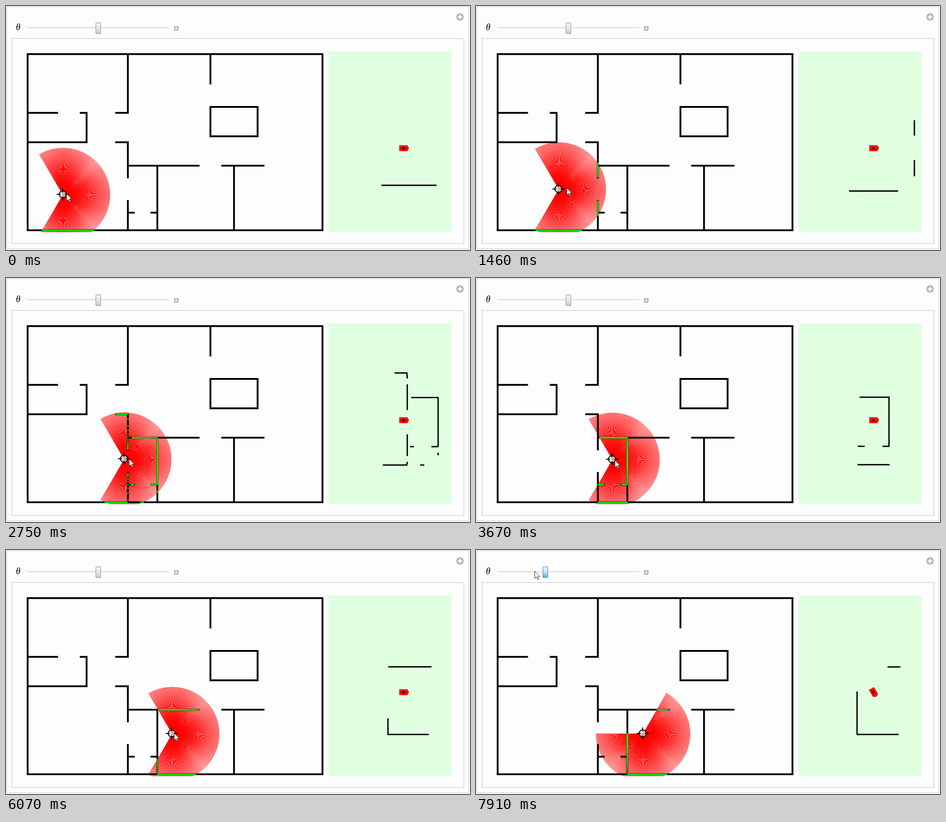
An HTML page with a canvas that plays this animation: 1030x544 px, repeating every 8 s.

```html
<!DOCTYPE html>
<html lang="en">
<head>
<meta charset="utf-8">
<title>Range scanner</title>
<style>
  html, body { margin: 0; width: 100%; height: 100%; overflow: hidden; background: #fff; }
  svg, canvas { position: absolute; left: 0; top: 0; width: 1030px; height: 544px; display: block; }
  text { font: italic 20px "Liberation Serif", "Noto Serif", serif; }
</style>
</head>
<body>
<svg viewBox="0 0 1030 544">
  <g fill="#fdfdfd" stroke="#c3c3c3">
    <rect x="1.5" y="1.5" width="1026" height="540" rx="1.5"/>
    <rect x="13.5" y="72.5" width="1003" height="457" stroke="#bdbdbd"/>
  </g>
  <text x="22" y="54">θ</text>
  <path d="M47 48.5H362" stroke="#b8b8b8"/>
  <rect x="373" y="45" width="10" height="10" fill="#b4b4b4"/>
  <path d="M375 50h6M378 47v6" stroke="#fff" stroke-width="1.6"/>
  <circle cx="1008" cy="24.5" r="8.5" fill="#b9b9b9"/>
  <path d="M1003 24.5h10M1008 19.5v10" stroke="#fff" stroke-width="2.6"/>
  <rect x="716" y="101" width="273" height="403.5" fill="#e0ffe0"/>
</svg>
<canvas id="stage" width="1030" height="544"></canvas>
<script>
const ctx = document.getElementById('stage').getContext('2d');
const LOOP = 8000, STEP = 184.1, START = 344, LAST = 43;
const UNIT = 65.45, ORIGIN = { x: 48, y: 107.3 };
const RANGE = 1.6 * UNIT, MIN_RANGE = 5.27, SPREAD = 120;
const SCALE = 1.046, JOIN = 15, HOME = { x: 882.5, y: 317 };
const REACH = 34, GRAB = 38;
const SLIDER = { x: 205, y: 46.5, pxPerDeg: 0.85 };

// Floor plan in room units.
const PLAN = `M0 0H10V6H0V0 M3.4 0V2H3 M6.2 0V1 M6.2 1.8H7.8V2.8H6.2V1.8
  M0 2H1 M1.8 2H2V3H0 M3 3H3.4V4.2 M3.4 5V6 M3.4 3.8H5.8 M6.6 3.8H8
  M4.4 3.8V6 M7 3.8V6 M3.4 5.4H3.6 M4.2 5.4H4.4`;

// Robot waypoints: step, x, y
const ROUTE = [
  [1, 126.5, 421], [5, 149.7, 418.3], [7, 168.5, 410.3], [11, 230.2, 403.8],
  [20, 303.2, 405.1], [22, 308, 410], [25, 308, 410], [28, 338.33, 410],
  [33, 369.1, 410], [REACH, 371, 409.8]
];

const rad = d => d * Math.PI / 180;
const clamp = u => Math.min(1, Math.max(0, u));
const lerp = (a, b, u) => a + (b - a) * u;

function parsePlan(plan) {
  const lines = [];
  let x = 0, y = 0;
  for (const [, cmd, a, b] of plan.matchAll(/([MHV])([\d.]+)(?: ([\d.]+))?/g)) {
    const px = x, py = y;
    if (cmd !== 'V') x = ORIGIN.x + a * UNIT;
    if (cmd !== 'H') y = ORIGIN.y + (cmd === 'V' ? a : b) * UNIT;
    if (cmd !== 'M') lines.push([Math.min(x, px), Math.min(y, py), Math.max(x, px), Math.max(y, py)]);
  }
  return lines;
}
const walls = parsePlan(PLAN);

const stepAt = t => t < START ? 1 : Math.min(LAST, 2 + Math.floor((t - START) / STEP));

function robotAt(n) {
  const i = Math.max(1, ROUTE.findIndex(p => p[0] >= Math.min(n, REACH)));
  const [n0, x0, y0] = ROUTE[i - 1], [n1, x1, y1] = ROUTE[i];
  const u = clamp((n - n0) / (n1 - n0));
  return { x: lerp(x0, x1, u), y: lerp(y0, y1, u) };
}

const dragAt = n => 75 * clamp((n - GRAB) / (LAST - GRAB)) ** 1.73;

// The pointer leads the robot by one step, then goes to the slider.
function pointerAt(n) {
  const lead = robotAt(n + 1);
  const u = 1 - (1 - clamp((n - REACH) / (GRAB - REACH))) ** 2;
  return {
    x: lerp(lead.x + 2, SLIDER.x, u) - dragAt(n),
    y: lerp(lead.y - 2, SLIDER.y, u)
  };
}

function castRay(x, y, angle) {
  const c = Math.cos(angle), s = Math.sin(angle);
  let best = null;
  for (const [x1, y1, x2, y2] of walls) {
    const flat = y1 === y2;
    const r = flat ? (y1 - y) / s : (x1 - x) / c;
    if (!(r >= MIN_RANGE && r <= (best ? best.r : RANGE))) continue;
    const hx = flat ? x + c * r : x1, hy = flat ? y1 : y + s * r;
    if (flat ? hx >= x1 && hx <= x2 : hy >= y1 && hy <= y2) best = { r, x: hx, y: hy };
  }
  return best;
}

function clipped(x, y, w, h, draw) {
  ctx.save();
  ctx.beginPath();
  ctx.rect(x, y, w, h);
  ctx.clip();
  draw();
  ctx.restore();
}

function strokeLines(lines, color, width, cap = 'butt') {
  ctx.beginPath();
  for (const [x1, y1, x2, y2] of lines) {
    ctx.moveTo(x1, y1);
    ctx.lineTo(x2, y2);
  }
  ctx.strokeStyle = color;
  ctx.lineWidth = width;
  ctx.lineCap = cap;
  ctx.stroke();
}

function disc(x, y, r, fill) {
  ctx.beginPath();
  ctx.arc(x, y, r, 0, 2 * Math.PI);
  ctx.fillStyle = fill;
  ctx.fill();
}

function shape(path, x, y, angle, fill, stroke) {
  ctx.save();
  ctx.translate(x, y);
  ctx.rotate(angle);
  ctx.fillStyle = fill;
  ctx.fill(path);
  if (stroke) {
    ctx.strokeStyle = stroke;
    ctx.lineWidth = 1;
    ctx.stroke(path);
  }
  ctx.restore();
}

const robotShape = new Path2D('M-9.5-6.5H8.5L11.5-1.5V1.5L8.5 6.5H-9.5Z');
const arrowShape = new Path2D('M0 0V16L3.7 12.5L6.3 18L8.7 17L6.2 11.5H11.2Z');

function drawFan({ x, y }, angles) {
  for (const a of angles) {
    strokeLines([[x, y, x + RANGE * Math.cos(a), y + RANGE * Math.sin(a)]], '#f00', 1);
  }
}

function drawLocalMap({ x, y }, hits) {
  const pts = hits.map(h => h && { x: HOME.x + (h.x - x) * SCALE, y: HOME.y + (h.y - y) * SCALE });
  const near = (a, b) => a && b && Math.hypot(a.x - b.x, a.y - b.y) < JOIN;
  const lines = [];
  pts.forEach((p, i) => {
    if (!p) return;
    const next = pts[i + 1];
    if (near(p, next)) lines.push([p.x, p.y, next.x, next.y]);
    else if (!near(p, pts[i - 1])) disc(p.x, p.y, 1, '#00a');
  });
  strokeLines(lines, '#000', 3, 'square');
}

function drawLocator(x, y) {
  disc(x, y, 8, 'rgba(205,205,205,.8)');
  ctx.strokeStyle = '#000';
  ctx.lineWidth = 2;
  ctx.stroke();
  const ticks = [];
  for (const s of [-1, 1]) ticks.push([x + 5 * s, y, x + 13.5 * s, y], [x, y + 5 * s, x, y + 13.5 * s]);
  strokeLines(ticks, '#000', 2);
}

function drawThumb(x, active) {
  const g = ctx.createLinearGradient(0, 38, 0, 61);
  const stops = active ? ['#e4f4fc', '#b8e2f6', '#56b4e0'] : ['#f6f6f6', '#e6e6e6', '#cdcdcd'];
  stops.forEach((c, i) => g.addColorStop(i / 2, c));
  ctx.beginPath();
  ctx.roundRect(Math.round(x) - 5.5, 37.5, 11, 24, 1.5);
  ctx.fillStyle = g;
  ctx.fill();
  ctx.strokeStyle = active ? '#3f7fae' : '#858585';
  ctx.lineWidth = 1;
  ctx.stroke();
}

function render(t) {
  const n = stepAt(t), robot = robotAt(n), pointer = pointerAt(n);
  const slide = dragAt(n - 1), theta = slide / SLIDER.pxPerDeg;
  const angles = Array.from({ length: 2 * SPREAD + 1 }, (_, i) => rad(theta + i - SPREAD));
  const hits = angles.map(a => castRay(robot.x, robot.y, a));

  ctx.clearRect(0, 0, 1030, 544);
  clipped(14, 101, 700, 403.5, () => drawFan(robot, angles));
  strokeLines(walls, '#000', 4, 'square');
  for (const h of hits) if (h) disc(h.x, h.y, 1.5, '#0f0');
  shape(robotShape, HOME.x, HOME.y, rad(theta), '#f00');
  clipped(716, 101, 273, 403.5, () => drawLocalMap(robot, hits));
  disc(HOME.x, HOME.y, 2.7, '#000');
  drawLocator(Math.round(robot.x - 1), Math.round(robot.y - 1));
  drawThumb(SLIDER.x - slide, n >= GRAB);
  shape(arrowShape, Math.round(pointer.x) + 0.5, Math.round(pointer.y) + 0.5, 0, '#fff', '#222');
}

function tick() {
  render(performance.now() % LOOP);
  requestAnimationFrame(tick);
}
tick();
</script>
</body>
</html>
```
